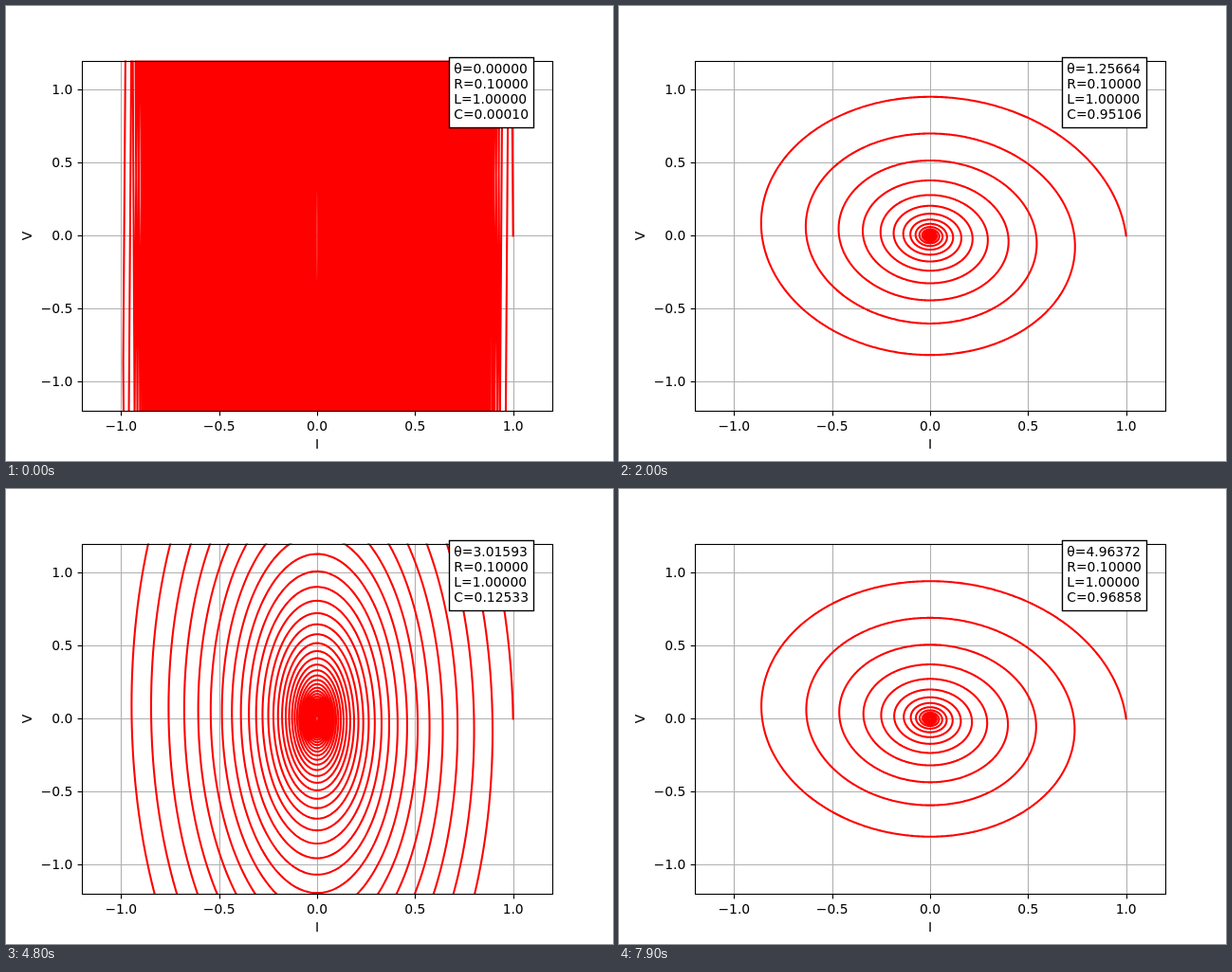
Write an HTML page with a canvas that moves like this. It is 640 by 480 pixels and loops after 8 s.

```html
<!DOCTYPE html>
<html lang="en">
<head>
<meta charset="utf-8">
<title>RLC phase portrait</title>
<style>
html, body { margin: 0; width: 100%; height: 100%; overflow: hidden; background: #fff; }
canvas { display: block; }
</style>
</head>
<body>
<canvas id="plot" width="640" height="480"></canvas>
<script>
const ctx = document.getElementById('plot').getContext('2d');
const LOOP = 8000, STEP = 100;
const R = 0.1, L = 1, DT = 0.01, SAMPLES = 10000;
const TICKS = [-1, -0.5, 0, 0.5, 1];
const LEFT = 80, TOP = 57.6, WIDTH = 496, HEIGHT = 369.6;

const px = i => 328 + i * WIDTH / 2.4;
const py = v => 242.4 - v * HEIGHT / 2.4;
const snap = x => Math.round(x) + 0.5;

function line(x1, y1, x2, y2) {
  ctx.beginPath();
  ctx.moveTo(x1, y1);
  ctx.lineTo(x2, y2);
  ctx.stroke();
}

function text(str, x, y, align) {
  ctx.textAlign = align;
  ctx.fillText(str, x, y);
}

function drawGrid() {
  ctx.strokeStyle = '#b0b0b0';
  ctx.lineWidth = 1.11;
  for (const t of TICKS) {
    line(snap(px(t)), 58, snap(px(t)), 428);
    line(80, snap(py(t)), 577, snap(py(t)));
  }
}

// Free decay of a series RLC circuit from I = 1, V = 0
function drawCurve(C) {
  const a = R / (2 * L), w = Math.sqrt(1 / (L * C) - a * a);
  ctx.save();
  ctx.beginPath();
  ctx.rect(LEFT, TOP, WIDTH, HEIGHT);
  ctx.clip();
  ctx.beginPath();
  for (let n = 0; n < SAMPLES; n++) {
    const t = n * DT, decay = Math.exp(-a * t);
    const cos = Math.cos(w * t), sin = Math.sin(w * t);
    ctx.lineTo(px(decay * (cos - a / w * sin)), py(decay * sin / (C * w)));
  }
  ctx.strokeStyle = '#f00';
  ctx.lineWidth = 2.083;
  ctx.lineJoin = 'round';
  ctx.lineCap = 'square';
  ctx.stroke();
  ctx.restore();
}

function drawAxes() {
  ctx.strokeStyle = ctx.fillStyle = '#000';
  ctx.lineWidth = 1.11;
  ctx.strokeRect(80.5, 58.5, 496, 369);
  for (const t of TICKS) {
    const x = px(t), y = py(t);
    const label = t.toFixed(1).replace('-', '\u2212');
    line(snap(x), 427.5, snap(x), 432.4);
    line(75.6, snap(y), 80.5, snap(y));
    text(label, x, 448, 'center');
    text(label, 70.3, Math.round(y) + 5, 'right');
  }
  text('I', 328, 467, 'center');
  ctx.save();
  ctx.translate(27, 242.4);
  ctx.rotate(-Math.PI / 2);
  text('V', 0, 0, 'center');
  ctx.restore();
}

function drawInfo(values) {
  ctx.fillStyle = '#fff';
  ctx.lineWidth = 1.39;
  ctx.fillRect(467.5, 54.5, 89, 74);
  ctx.strokeRect(467.5, 54.5, 89, 74);
  ctx.fillStyle = '#000';
  Object.entries(values).forEach(([name, v], i) =>
    text(`${name}=${v.toFixed(5)}`, 472.3, 71 + 16 * i, 'left'));
}

function draw(step) {
  const theta = step * Math.PI / 50;
  const C = Math.max(Math.abs(Math.sin(theta)), 1e-4);
  ctx.fillStyle = '#fff';
  ctx.fillRect(0, 0, 640, 480);
  ctx.font = '13.89px "DejaVu Sans", sans-serif';
  drawGrid();
  drawCurve(C);
  drawAxes();
  drawInfo({ 'θ': theta, R, L, C });
}

let shown = -1;
function tick() {
  const step = Math.floor(performance.now() % LOOP / STEP);
  if (step !== shown) draw(shown = step);
  requestAnimationFrame(tick);
}
tick();
</script>
</body>
</html>
```
